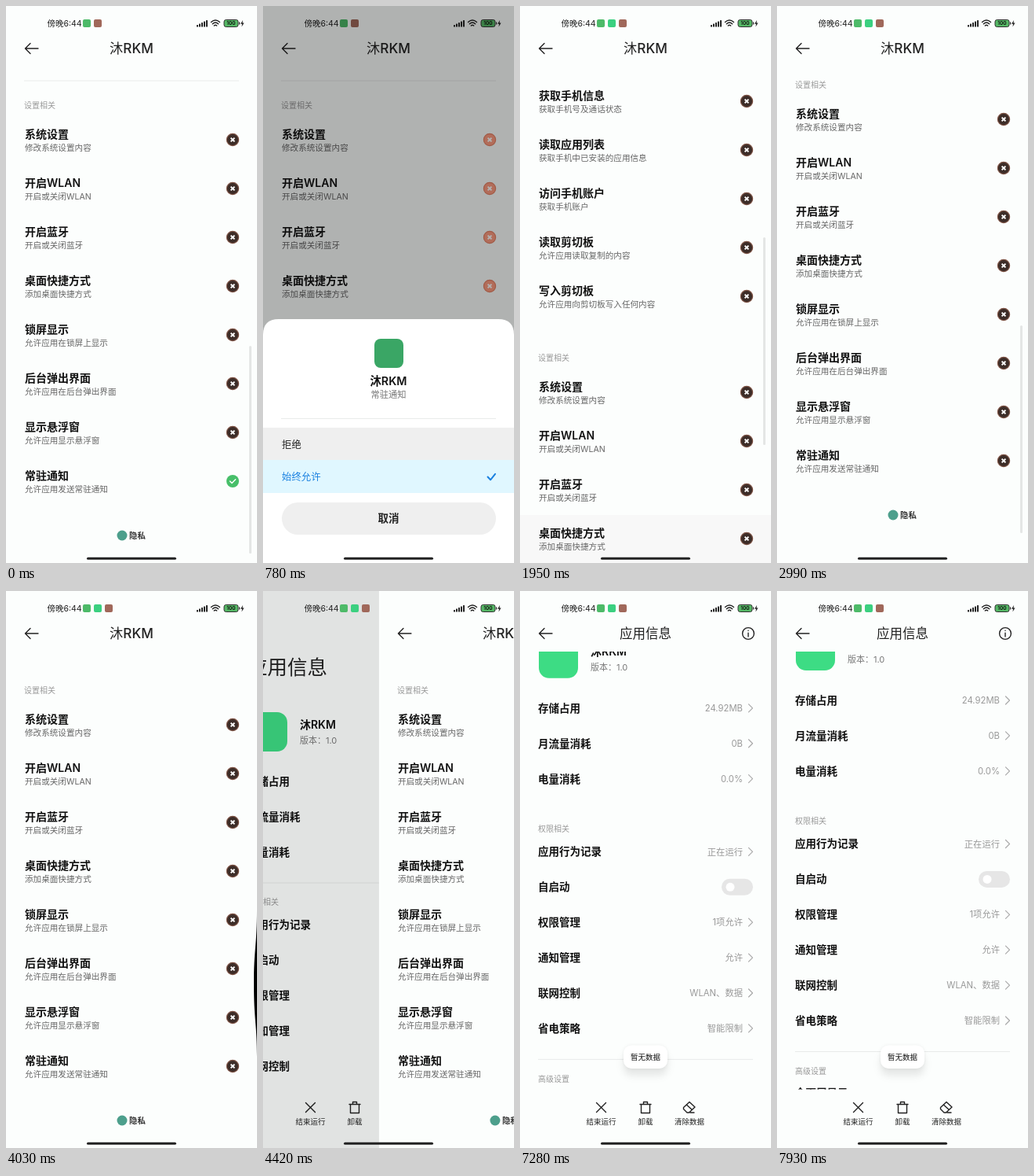
An HTML page that plays this animation: 320 px wide and 708 px high, repeating every 8 s.

```html
<!DOCTYPE html>
<html lang="zh-CN">
<head>
<meta charset="utf-8">
<title>权限设置</title>
<style>
html, body { margin: 0; height: 100%; overflow: hidden; background: #fcfefd; }
svg { display: block; width: 100vw; height: 100vh; font-family: Inter, "Noto Sans CJK SC", "Noto Sans CJK", sans-serif; }
.line { fill: none; stroke: #222; stroke-width: 1.4; stroke-linecap: round; stroke-linejoin: round; }
.rule { stroke: #e9ebea; }
.toast { filter: drop-shadow(0 9px 5px rgba(0, 0, 0, .09)) drop-shadow(0 0 2px rgba(0, 0, 0, .06)); }
</style>
</head>
<body>
<svg id="stage" viewBox="0 0 320 708"></svg>
<script>
const LOOP = 8000, STEP = 130, APP = '沐RKM', PAPER = '#fcfefd';
const stage = document.getElementById('stage');

const text = (x, y, size, str, fill = '#111', weight = 400, anchor = 'start') =>
  `<text x="${x}" y="${y + size * .37}" font-size="${size}" fill="${fill}" font-weight="${weight}" text-anchor="${anchor}">${str}</text>`;
const rect = (x, y, w, h, fill, r = 0, more = '') =>
  `<rect x="${x}" y="${y}" width="${w}" height="${h}" rx="${r}" fill="${fill}" ${more}/>`;
const line = (d, more = '') => `<path class="line" d="${d}" ${more}/>`;
const rule = (y, id = '') => `<path class="rule" id="${id}" d="M23 ${y}H297"/>`;
const back = line('M41 54H24.5M31 47.5L24.5 54L31 60.5');

// Permission list
const cross = y => `<g><circle class="no" cx="289" cy="${y}" r="7.6" stroke-width="1.2"/>` +
  `<path d="M286.6 ${y - 2.4}l4.8 4.8m0-4.8l-4.8 4.8" stroke="#fff" stroke-width="2"/></g>`;
const check = y => `<g id="allowed"><circle cx="289" cy="${y}" r="8" fill="#47bf69"/>` +
  line(`M285.5 ${y}l2.5 2.6l4.6-4.8`, 'style="stroke:#fff"') + '</g>';
const permission = (y, [name, note]) =>
  text(24, y, 14, name, '#111', 600) + text(24, y + 17, 10.6, note, '#666') + cross(y + 7);
const privacy = [
  ['获取手机信息', '获取手机号及通话状态'], ['读取应用列表', '获取手机中已安装的应用信息'],
  ['访问手机账户', '获取手机账户'], ['读取剪切板', '允许应用读取复制的内容'],
  ['写入剪切板', '允许应用向剪切板写入任何内容']];
const system = [
  ['系统设置', '修改系统设置内容'], ['开启WLAN', '开启或关闭WLAN'], ['开启蓝牙', '开启或关闭蓝牙'],
  ['桌面快捷方式', '添加桌面快捷方式'], ['锁屏显示', '允许应用在锁屏上显示'],
  ['后台弹出界面', '允许应用在后台弹出界面'], ['显示悬浮窗', '允许应用显示悬浮窗'],
  ['常驻通知', '允许应用发送常驻通知']];

const listPage = `<g id="list">${rect(0, 0, 320, 708, PAPER)}
  <g clip-path="url(#listClip)"><g id="listBody">
    ${rect(0, 326, 320, 62, '#f8f8f8', 0, 'id="pressShortcut"')}
    ${rect(0, 574, 320, 62, '#f0f0f0', 0, 'id="pressNotice"')}
    ${privacy.map((p, i) => permission(-207 + 62 * i, p)).join('')}
    ${rule(95, 'listRule')}${text(23, 126, 10, '设置相关', '#999')}
    ${system.map((p, i) => permission(163 + 62 * i, p)).join('')}${check(604)}
    <circle cx="148" cy="673" r="6.5" fill="#4d9f8c"/>${text(157, 673, 10.4, '隐私', '#333', 600)}
  </g></g>
  ${rect(310, 432, 3, 264, '#e4e6e5', 1.5, 'id="bar"')}
  ${back}${text(160, 54, 17.2, APP, '#222', 500, 'middle')}</g>`;

// App details
const item = (y, name, value) => text(23, y, 13.5, name, '#111', 600) + (value
  ? text(284, y, 11.3, value, '#999', 400, 'end') + line(`M291.5 ${y - 5}l5 5l-5 5`, 'style="stroke:#aaa;stroke-width:1.2"')
  : rect(257, y - 10.5, 40, 21, '#e6e6e6', 10.5) + `<circle cx="268" cy="${y}" r="5.5" fill="#fff"/>`);
const items = (y, rows) => rows.map((r, i) => item(y + 44.9 * i, ...r)).join('');
const action = (x, label, d) => line(d) + text(x, 674.5, 9.5, label, '#222', 400, 'middle');

const infoPage = `<g id="info">${rect(0, 0, 320, 708, PAPER)}
  <g clip-path="url(#infoClip)"><g id="infoBody">
    <g id="bigTitle">${text(23, 97, 25.5, '应用信息', '#222', 300)}</g>
    ${rect(24, 154, 50, 50, '#3ddc84', 13)}
    ${text(90, 170, 14, APP, '#111', 600)}${text(90, 190, 11, '版本：1.0', '#777')}
    ${items(242, [['存储占用', '24.92MB'], ['月流量消耗', '0B'], ['电量消耗', '0.0%']])}
    ${rule(371, 'infoRule')}${text(23, 395, 10, '权限相关', '#999')}
    ${items(424.5, [['应用行为记录', '正在运行'], ['自启动'], ['权限管理', '1项允许'],
      ['通知管理', '允许'], ['联网控制', 'WLAN、数据'], ['省电策略', '智能限制']])}
    ${rule(688.5)}${text(23, 713, 10, '高级设置', '#999')}${text(23, 741, 13.5, '全面屏显示', '#111', 600)}
  </g></g>
  ${back}<g id="smallTitle">${text(160, 54, 16.5, '应用信息', '#222', 500, 'middle')}</g>
  <circle class="line" cx="291" cy="54" r="7.4"/>${line('M291 53.2V58M291 50.2V50.4')}
  ${action(103.5, '结束运行', 'M97.5 650.5l12 12m0-12l-12 12')}
  ${action(160, '卸载', 'M153 652.5H167M157.5 652V649.5H162.5V652M154.5 653V663.5H165.5V653')}
  ${action(216, '清除数据', 'M208.5 656.5L216 649.5L223 656L215.5 663H213L208.5 658.5ZM212.3 653L219.5 659.5M217 663H222')}
  ${rect(0, 0, 320, 708, '#000', 0, 'id="infoDim"')}</g>`;

// Status bar and overlays
const status = text(52.5, 22, 10.5, '傍晚6:44', '#222') +
  rect(98, 17, 10, 10, '#4dba68', 2) + rect(112, 17, 10, 10, '#3bd080', 2, 'id="newIcon"') +
  rect(112, 17, 10, 10, '#a0685a', 2, 'id="recIcon"') +
  [2.5, 4, 5.5, 7, 8.5].map((h, i) => rect(243 + 3 * i, 26.5 - h, 2, h, '#222', .6)).join('') +
  line('M261.5 20.5Q267 15.5 272.5 20.5M263.3 22.8Q267 19.3 270.7 22.8M265.3 25Q267 23.4 268.7 25') +
  rect(278, 17.5, 18, 9, '#55b865', 2.5, 'stroke="#333"') + rect(297, 20.5, 1.2, 3, '#333') +
  text(287, 22, 6.5, '100', '#111', 600, 'middle') + '<path d="M302 18l-3 4.7h2l-.5 3.8l3-5h-2z" fill="#222"/>';

const sheet = `<g id="sheet"><path d="M0 730V418Q0 398 20 398H300Q320 398 320 418V730Z" fill="#fff"/>
  ${rect(142, 423, 37, 37, '#3aa665', 8)}
  ${text(160, 477, 14.3, APP, '#111', 600, 'middle')}${text(160, 493.5, 11.3, '常驻通知', '#777', 400, 'middle')}
  ${rule(524.5)}${rect(0, 536, 320, 41, '#efefef', 0, 'id="pressDeny"')}${rect(0, 577, 320, 42, '#e0f7ff')}
  ${text(24, 557, 12.4, '拒绝', '#222', 500)}${text(24, 598, 12.4, '始终允许', '#1a80e0', 500)}
  ${line('M286.5 598.5l3.5 3.8l6-7.5', 'style="stroke:#1a80e0;stroke-width:2"')}
  ${rect(24, 631, 273, 41, '#efefef', 20.5)}${text(160, 651.5, 13.5, '取消', '#222', 600, 'middle')}</g>`;

const toast = `<g id="toast" class="toast">${rect(132, 577.5, 56, 29.5, '#fff', 10)}</g>
  <g id="toastText">${text(160, 592.5, 9.5, '暂无数据', '#111', 400, 'middle')}</g>`;

stage.innerHTML = `<defs><clipPath id="listClip">${rect(0, 77, 320, 631, '#000')}</clipPath>
  <clipPath id="infoClip">${rect(0, 77, 320, 556.5, '#000')}</clipPath></defs>
  ${infoPage}${listPage}${status}${rect(0, 0, 320, 708, '#000', 0, 'id="dim"')}${sheet}
  <path id="edge"/>${toast}${rect(103, 700.7, 114, 3, '#222', 1.5)}`;

const el = {};
stage.querySelectorAll('[id]').forEach(n => { if (n.id) el[n.id] = n; });
const crosses = stage.querySelectorAll('.no');
const lastCross = crosses[crosses.length - 1].parentNode;

// Eased value through pairs of time and value
function keys(t, ...k) {
  if (t <= k[0]) return k[1];
  for (let i = 2; i < k.length; i += 2) if (t < k[i]) {
    const p = (t - k[i - 2]) / (k[i] - k[i - 2]);
    return k[i - 1] + (k[i + 1] - k[i - 1]) * (1 - (1 - p) ** 2);
  }
  return k[k.length - 1];
}
const move = (name, x, y) => el[name].setAttribute('transform', `translate(${x} ${y})`);
const fade = (name, a) => { el[name].style.opacity = Math.max(0, Math.min(1, a)); };
const during = (t, a, b) => +(t >= a && t < b);

function draw(t) {
  const open = keys(t, 200, 0, 560, 1, 900, 1, 1220, 0);
  move('sheet', 0, 320 * (1 - open));
  fade('dim', .3 * open);
  for (const c of crosses) {
    c.setAttribute('fill', open > .5 ? '#ff9c80' : '#3d2d28');
    c.setAttribute('stroke', open > .5 ? '#e58064' : '#7d5244');
  }
  fade('pressNotice', during(t, 130, 300));
  fade('pressDeny', during(t, 700, 1250));
  fade('pressShortcut', during(t, 1950, 2080));
  const denied = t >= 1000;
  fade('allowed', !denied);
  lastCross.style.opacity = +denied;
  fade('newIcon', t >= 1300);
  move('recIcon', t >= 1300 ? 14 : 0, 0);

  const y = keys(t, 1430, 0, 1900, 321, 2080, 321, 2730, -20, 2860, -30, 2990, -26, 3500, 0);
  move('listBody', 0, y);
  move('bar', 0, y > 0 ? -.43 * y : y);
  fade('bar', keys(t, 200, 1, 600, 0, 1400, 0, 1560, 1, 3600, 1, 3900, 0));
  fade('listRule', t < 1430);

  const d = keys(t, 3900, 0, 4030, 4, 4160, 14, 4290, 0);
  el.edge.setAttribute('d', `M320 405C320 450 ${320 - d} 455 ${320 - d} 500S320 550 320 592Z`);
  const slide = keys(t, 4260, 0, 4860, 1);
  move('list', 320 * slide, 0);
  move('info', -80 * (1 - slide), 0);
  fade('infoDim', .2 * (1 - slide));

  const s = keys(t, 6700, 0, 7540, 103);
  move('infoBody', 0, -s);
  fade('bigTitle', 1 - s / 30);
  fade('smallTitle', (s - 30) / 30);
  fade('infoRule', s === 0);
  fade('toast', keys(t, 5900, 0, 6110, 1));
  fade('toastText', keys(t, 6080, 0, 6450, 1));
}

function tick(now) {
  const t = now % LOOP;
  draw(t - t % STEP);
  requestAnimationFrame(tick);
}
draw(0);
requestAnimationFrame(tick);
</script>
</body>
</html>
```
